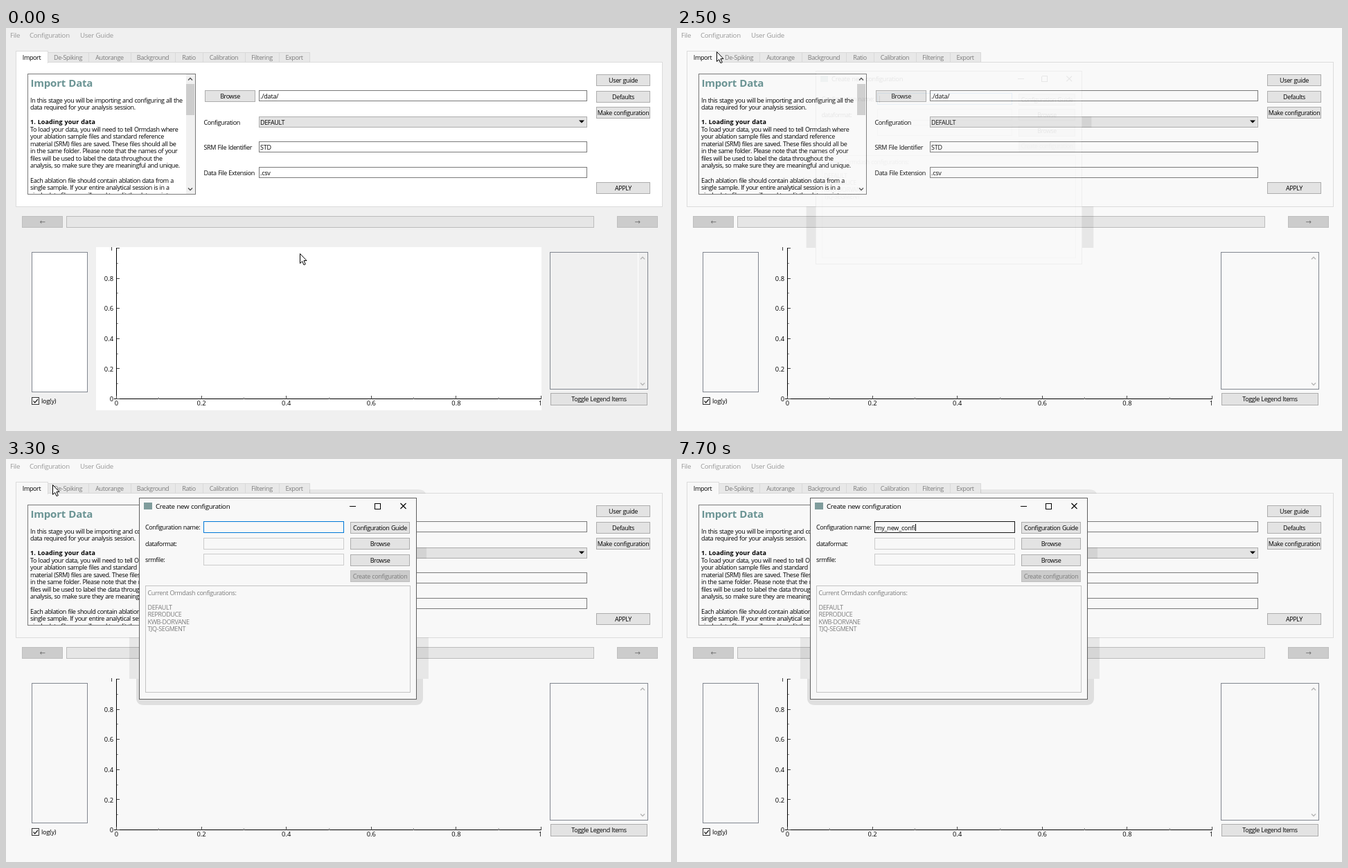
Animation, 960 px wide and 583 px high, one loop 8 s. Source, as an HTML page:

```html
<!DOCTYPE html>
<html lang="en">
<head>
<meta charset="utf-8">
<title>Create new configuration</title>
<style>
  html, body { margin: 0; width: 100%; height: 100%; overflow: hidden; background: #f0f0f0; }
  svg { display: block; width: 960px; height: 583px; --bg: #f0f0f0; --paper: #fff; --menu: #999; }
  text { font: 9px "Open Sans", "Noto Sans", "DejaVu Sans", sans-serif; letter-spacing: -.38px; word-spacing: .5px; white-space: pre; }
  rect, .crisp { shape-rendering: crispEdges; }
  .mid { text-anchor: middle; }
  .end { text-anchor: end; }
  .grey { fill: #7c7c7c; }
  .bold { font-weight: 700; letter-spacing: .05px; }
  .head { font-size: 15px; font-weight: 700; letter-spacing: -.2px; fill: #6b9494; }
  .ui { font-size: 9.7px; letter-spacing: -.3px; }
  .bar { fill: var(--menu); }
  .axis { font-size: 9.4px; letter-spacing: 0; }
  .typed { letter-spacing: -.2px; }
  .arrow { font: 10px "DejaVu Sans", sans-serif; fill: #6d6d6d; }
</style>
</head>
<body>
<svg id="stage" viewBox="0 0 960 583" xmlns="http://www.w3.org/2000/svg"></svg>
<script>
const PAPER = 'var(--paper)', BG = 'var(--bg)', EDGE = '#7a7a7a';
const CYCLE = 8000;

// Corners are whole pixels; the outline runs along their centres.
const box = (x, y, x2, y2, fill, stroke, id = '') =>
  `<rect id="${id}" x="${x + .5}" y="${y + .5}" width="${x2 - x}" height="${y2 - y}" style="fill:${fill};stroke:${stroke}"/>`;
const fill = (x, y, x2, y2, color, id = '') =>
  `<rect id="${id}" x="${x}" y="${y}" width="${x2 - x}" height="${y2 - y}" style="fill:${color}"/>`;
const text = (x, y, s, cls = '') => `<text x="${x}" y="${y}" class="${cls}">${s}</text>`;
const line = (d, stroke = '#000', cls = 'crisp', width = 1) =>
  `<path d="${d}" class="${cls}" fill="none" stroke="${stroke}" stroke-width="${width}"/>`;
const button = (x, y, x2, y2, label, off) =>
  box(x, y, x2, y2, off ? '#ccc' : '#e3e3e3', off ? '#bfbfbf' : '#adadad') +
  text((x + x2 + 1) / 2, (y + y2) / 2 + 3.8, label, 'mid ' + (off || ''));
const chevron = (x, y, dir, color) =>
  line(`M${x - 3} ${y + 1.5 * dir}l3 ${-3 * dir}l3 ${3 * dir}`, color, '', 1.3);

function menuBar() {
  return box(27, 2, 99, 17, '#cce8ff', '#99d1ff', 'menuHot') +
    text(6, 14, 'File', 'ui bar') + text(34, 14, 'Configuration', 'ui bar') + text(107, 14, 'User Guide', 'ui bar');
}

function tabs() {
  const names = ['De-Spiking', 'Autorange', 'Background', 'Ratio', 'Calibration', 'Filtering', 'Export'];
  const edges = [60, 119, 180, 244, 284, 345, 394, 438];
  return box(14, 49, 947, 258, PAPER, '#dcdcdc') +
    names.map((name, i) => box(edges[i], 35, edges[i + 1], 49, '#e8e8e8', '#d9d9d9') +
      text((edges[i] + edges[i + 1]) / 2, 46.3, name, 'mid grey')).join('') +
    box(14, 33, 60, 50, PAPER, '#dcdcdc') + fill(15, 48, 60, 52, PAPER) + text(37, 45.8, 'Import', 'mid');
}

function guide() {
  const lines = [
    'In this stage you will be importing and configuring all the',
    'data required for your analysis session.', '',
    '1. Loading your data',
    'To load your data, you will need to tell Ormdash where',
    'your ablation sample files and standard reference',
    'material (SRM) files are saved. These files should all be',
    'in the same folder. Please note that the names of your',
    'files will be used to label the data throughout the',
    'analysis, so make sure they are meaningful and unique.', '',
    'Each ablation file should contain ablation data from a',
    'single sample. If your entire analytical session is in a',
    'single data file, you will need to split the data up into'];
  return box(31, 66, 273, 240, PAPER, EDGE) +
    '<clipPath id="page"><rect x="32" y="67" width="228" height="173"/></clipPath><g clip-path="url(#page)">' +
    text(35.5, 85, 'Import Data', 'head') +
    lines.map((s, i) => text(35, 107.5 + 10.55 * i, s, i === 3 ? 'bold' : '')).join('') + '</g>' +
    fill(260, 67, 273, 240, BG) + fill(260, 81, 272, 126, '#cdcdcd') +
    chevron(266, 74, 1, '#505050') + chevron(266, 233, -1, '#505050');
}

function importForm() {
  const field = (y, s) => box(365, y, 838, y + 15, PAPER, EDGE) + text(367, y + 11.7, s, 'typed');
  return button(287, 90, 359, 106, 'Browse') + field(90, './data/') +
    text(285.5, 139.5, 'Configuration') + box(365, 128, 838, 143, '#e3e3e3', '#adadad') +
    text(367, 139.5, 'DEFAULT') + '<path d="M827 133.500h8l-4 4z"/>' +
    text(285.5, 176, 'SRM File Identifier') + field(164, 'STD') +
    text(285.5, 212.5, 'Data File Extension') + field(201, '.csv') +
    button(852, 67, 929, 83, 'User guide') + button(852, 91, 929, 107, 'Defaults') +
    button(852, 114, 929, 130, 'Make configuration') + button(852, 223, 929, 239, 'APPLY') +
    button(23, 272, 81, 288, '←', 'arrow') + box(87, 272, 848, 288, '#e6e6e6', '#bcbcbc') +
    button(882, 272, 940, 288, '→', 'arrow');
}

function plot() {
  let s = fill(130, 317, 773, 553, PAPER) +
    line('M159.500 318V537M156 536.500H773');
  for (let i = 0; i <= 5; i++) {
    const x = 159.5 + 122.6 * i, y = 536.5 - 43.6 * i, label = +(i / 5).toFixed(1);
    s += line(`M${x} 537v-5M160 ${y}h4`, '#444') +
      text(Math.min(x, 771.5), 546, label, 'mid axis') + text(155, y + 3.7, label, 'end axis');
    if (i < 5) s += line(`M${x + 61.3} 537v-3M160 ${y - 21.8}h2`, '#888');
  }
  return `<clipPath id="plotArea"><rect x="130" y="317" width="643" height="236"/></clipPath>
    <g clip-path="url(#plotArea)">${s}</g>`;
}

function sidePanels() {
  return box(37, 324, 117, 526, PAPER, '#828790') +
    box(37, 534, 47, 544, PAPER, '#333') + line('M39.500 539.500l2.200 2.500l4.300-5', '#222', '', 1.2) +
    text(51, 542.5, 'log(y)', 'typed') +
    box(785, 324, 926, 522, BG, '#828790') + line('M912.500 325V522', PAPER) +
    chevron(919, 333, 1, '#b5b5b5') + chevron(919, 515, -1, '#b5b5b5') +
    button(786, 528, 925, 545, 'Toggle Legend Items');
}

function dropDown() {
  return `<g id="menu">` +
    fill(32, 23, 114, 44, 'rgba(0,0,0,.14)') + fill(31, 22, 112, 42, 'rgba(0,0,0,.3)') +
    box(28, 18, 110, 39, PAPER, '#ccc') + fill(30, 21, 109, 38, '#91c9f7', 'itemHot') +
    text(56, 33, 'Make', 'ui') + '</g>';
}

function shadow() {
  return `<g fill="#000" fill-opacity=".07"><g id="bands">
      <path d="M178 258h14v60h-14zM593 258h17v60h-17zM593 128h14v16h-14z"/></g>
    <g id="rim"><path d="M438 44H594Q604 44 606 50H438z"/>
      <path fill-opacity=".1" d="M188 318H602V345Q602 356 591 356H199Q188 356 188 345z"/></g></g>`;
}

function dialog() {
  const row = (y, label, edge, id) => text(201, y + 12.3, label) + box(285, y, 487, y + 16, PAPER, edge, id);
  const list = ['Current Ormdash configurations:', '', 'DEFAULT', 'REPRODUCE', 'KWB-DORVANE', 'TJQ-SEGMENT'];
  return `<g id="dialog">` + box(192, 56, 592, 347, PAPER, '#606060') +
    fill(199, 63, 211, 73, '#7f9c9c') + text(216, 72, 'Create new configuration', 'ui') +
    line('M496 68.500h9M532.500 64.500h8v8h-8z') + line('M569.500 64l8 8m0-8l-8 8', '#000', '', 1.1) +
    row(90, 'Configuration name:', '#0078d7', 'nameField') +
    row(114, 'dataformat:', '#ccc') + row(137, 'srmfile:', '#ccc') +
    button(497, 91, 582, 107, 'Configuration Guide') + button(497, 114, 582, 130, 'Browse') +
    button(497, 138, 582, 154, 'Browse') + button(497, 161, 582, 177, 'Create configuration', 'grey') +
    box(201, 183, 583, 337, PAPER, '#c4c4c4') +
    list.map((s, i) => text(204.5, 196.5 + 10.5 * i, s, 'grey')).join('') +
    `<text id="entry" x="287" y="102.500" class="typed"></text>` + fill(0, 94, 1, 104, '#000', 'caret') + '</g>';
}

const pointer = `<path id="pointer" d="M.5 .5V14.500L3.700 11.500L6 16.700L8.300 15.700L6 10.500H10z" fill="#fff" stroke="#000"/>`;

const stage = document.getElementById('stage');
stage.innerHTML = fill(0, 0, 960, 583, BG) + menuBar() + tabs() + guide() + importForm() + plot() +
  sidePanels() + dropDown() + shadow() + dialog() + pointer;
const el = id => document.getElementById(id);
const show = (id, on) => { el(id).style.visibility = on ? 'visible' : 'hidden'; };

const moves = [ // from time, to time, start point, end point
  [0, 900, [424, 326], [51, 15]],
  [900, 1000, [51, 15], [51, 10]],
  [1800, 2000, [51, 10], [57, 34]],
  [3200, 4000, [57, 34], [300, 99]]];
const opening = { 2500: [.96, .07], 2600: [.985, .6], 2700: [.997, .89] };
const NAME = 'my_new_confi';
const keyTimes = [5100, 5200, 5600, 5900, 6100, 6200, 6500, 7100, 7200, 7400, 7600, 7700];

function pointerAt(t) {
  const [from, to, a, b] = moves.filter(m => t >= m[0]).pop();
  const p = Math.min(1, (t - from) / (to - from)), eased = p * p * (3 - 2 * p);
  return a.map((v, i) => Math.round(v + (b[i] - v) * eased));
}

function render(time) {
  const t = Math.floor(time / 100) * 100;
  const menuOpen = t >= 1500 && t < 2500, open = t >= 2500;
  const tone = t < 1500 ? null : t < 2500 ? '#fbfbfb' : t < 2700 ? '#f9f9f9' : '#f8f8f8';
  stage.style.setProperty('--bg', tone || '#f0f0f0');
  stage.style.setProperty('--paper', tone || '#fff');
  stage.style.setProperty('--menu', menuOpen ? '#000' : '#999');

  show('menuHot', t >= 900 && !open);
  el('menuHot').style.fill = menuOpen ? '#cce8ff' : '#e5f3ff';
  show('menu', menuOpen);
  el('menu').style.opacity = t < 1600 ? .93 : 1;
  el('itemHot').style.opacity = t >= 1900 ? 1 : 0;

  const [scale, alpha] = opening[t] || [1, 1];
  show('bands', open);
  show('rim', t >= 2600);
  show('dialog', open);
  el('bands').setAttribute('transform', `translate(392.500 0) scale(${scale} 1) translate(-392.500 0)`);
  el('dialog').setAttribute('transform', `translate(392.500 202) scale(${scale}) translate(-392.500 -202)`);
  el('dialog').style.opacity = alpha;

  const inField = t >= 3900;
  el('nameField').style.stroke = inField ? '#171717' : '#0078d7';
  const count = keyTimes.filter(k => t >= k).length;
  const entry = el('entry');
  entry.textContent = NAME.slice(0, count);
  el('caret').setAttribute('x', Math.round(288 + (count ? entry.getComputedTextLength() - .5 : 0)));
  show('caret', open && (count > 0 || Math.floor((t - 2500) / 500) % 2 === 0));

  show('pointer', !inField);
  el('pointer').setAttribute('transform', `translate(${pointerAt(t)})`);
}

const start = performance.now();
function tick() {
  render((performance.now() - start) % CYCLE);
  requestAnimationFrame(tick);
}
tick();
</script>
</body>
</html>
```
